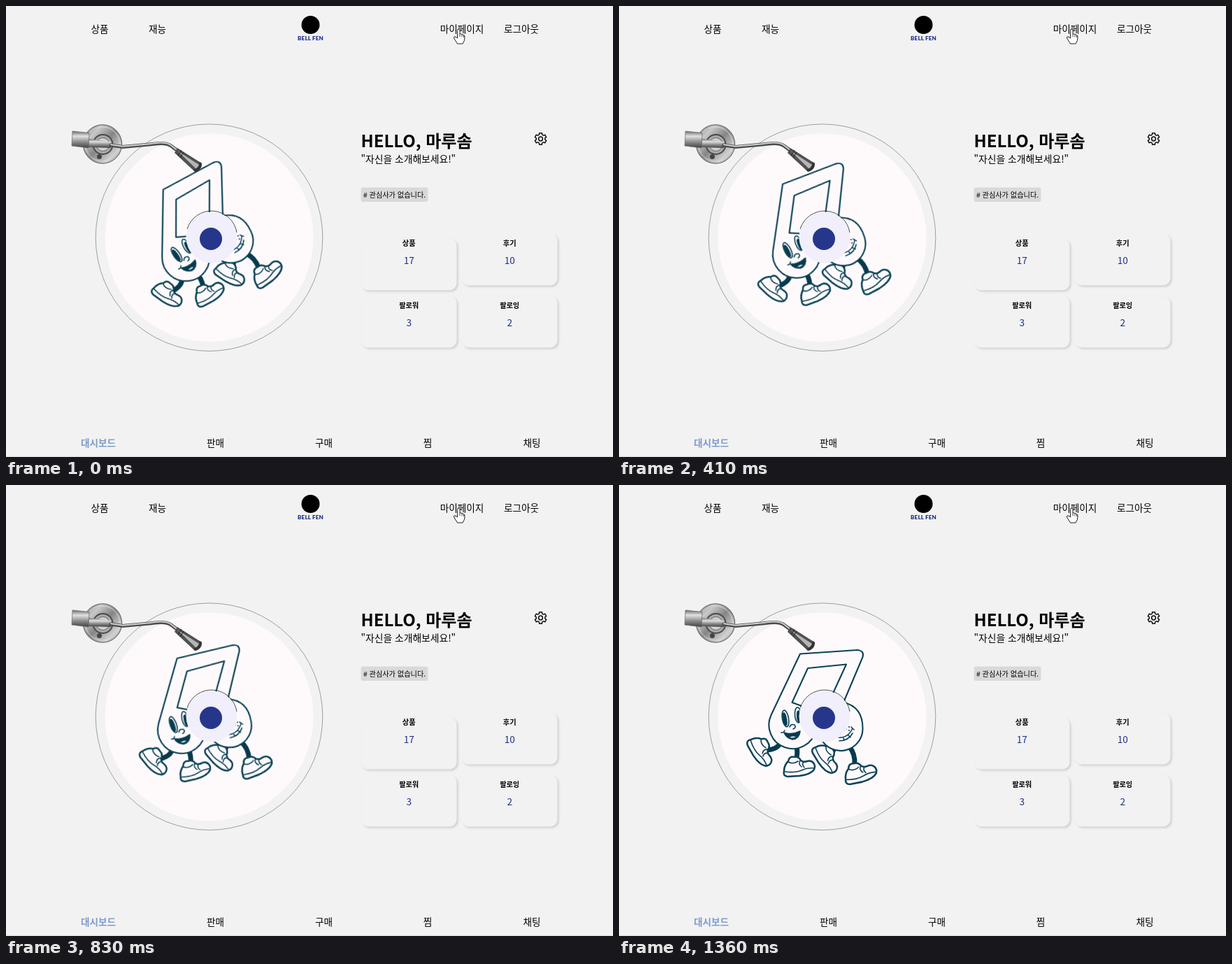
An HTML page for the animation above (1430 ms loop, 868x645 px).

```html
<!DOCTYPE html>
<html lang="ko">
<head>
<meta charset="utf-8">
<title>Dashboard</title>
<style>
  html, body { margin: 0; width: 100%; height: 100%; overflow: hidden; background: #f2f2f2; }
  svg { display: block; width: 868px; height: 645px; }
  text { font: 400 13.6px "Noto Sans CJK KR", "Noto Sans KR", "Noto Sans CJK", sans-serif; fill: #000; }
  .card { fill: #f2f2f2; filter: drop-shadow(2px 2px 1.5px #cfcfcf); }
  #walker { transform-origin: 290.5px 331px; }
  .ink { fill: #fefafc; stroke: #0c4257; stroke-width: 2.1; stroke-linejoin: round; stroke-linecap: round; }
  .fine { stroke-width: 1.6; }
  .heavy { stroke-width: 2.5; }
  .line { fill: none; }
  .leg { fill: none; stroke: #073a4c; stroke-width: 7; stroke-linecap: round; }
  .dark { fill: #073a4c; }
</style>
</head>
<body>
<svg viewBox="0 0 868 645">
  <defs>
    <linearGradient id="steel" x1="0" y1="0" x2="1" y2="1">
      <stop offset="0" stop-color="#6a6a6a"/><stop offset=".25" stop-color="#c9c9c9"/>
      <stop offset=".5" stop-color="#858585"/><stop offset=".78" stop-color="#d0d0d0"/>
      <stop offset="1" stop-color="#6e6e6e"/>
    </linearGradient>
    <linearGradient id="tube" x1="0" y1="0" x2="0" y2="1">
      <stop offset="0" stop-color="#6a6a6a"/><stop offset=".3" stop-color="#e2e2e2"/>
      <stop offset=".65" stop-color="#8a8a8a"/><stop offset="1" stop-color="#404040"/>
    </linearGradient>
    <g id="shoe" class="ink heavy">
      <path d="M-10 3Q-9-4-2-3Q5-4 8 2Q12 5 17 3C25 1 30 8 27 15Q22 22 6 24L-11 25Q-18 24-16 17Q-16 9-10 3Z"/>
      <path class="line fine" d="M-15 18Q0 20 9 16T27 13M7 2Q4 7 9 11M12 4Q9 8 13 12M-10 4Q-3 8 4 3"/>
    </g>
  </defs>

  <rect y="644" width="868" height="1" fill="#dcdcdc"/>

  <circle cx="435.5" cy="27" r="13" fill="#000"/>

  <circle cx="290.5" cy="331.2" r="162.3" fill="none" stroke="#666" stroke-width=".6"/>
  <circle cx="290.5" cy="331.2" r="149" fill="#fefafc"/>

  <g id="walker">
    <path class="leg" d="M231 368Q228 377 213 379M254 374Q256 384 253 394M308 376Q306 384 299 386M329 374Q338 384 337 400"/>
    <use href="#shoe" transform="translate(211 371) rotate(64)"/>
    <use href="#shoe" transform="translate(252 392)"/>
    <use href="#shoe" transform="translate(304 381) rotate(62)"/>
    <use href="#shoe" transform="translate(338 401) rotate(-8) scale(1.03)"/>
    <path class="ink" d="M259 241.500L341 236Q351 237 348.500 246L321 311Q348.500 317 348.500 348A31.500 31.500 0 0 1 289 363L281.500 351A34 34 0 1 1 217.500 329Z"/>
    <path class="ink" d="M270 262L325 256.500L305 300L290 320L261 316L247.500 311Z"/>
    <g class="ink fine">
      <ellipse cx="238" cy="334" rx="4.500" ry="12" transform="rotate(-10 238 334)"/>
      <ellipse cx="256" cy="329" rx="4.500" ry="11" transform="rotate(-4 256 329)"/>
      <ellipse class="dark" cx="237" cy="335" rx="2.500" ry="9" transform="rotate(-10 237 335)"/>
      <ellipse class="dark" cx="257" cy="331" rx="2.300" ry="8" transform="rotate(-4 257 331)"/>
      <path class="line" d="M244 346Q246 341 251 343Q254 347 249 349"/>
      <path class="dark" d="M236 354Q247 358 259 352Q258 363 248 364Q239 362 236 354Z"/>
      <path d="M243 361Q248 357 254 360Q249 364 243 361Z"/>
      <path class="line" d="M232 354Q235 355 237 351M312 361Q327 363 334 348M315 366Q328 366 334 355M321 362L322 365M328 358L331 361M332 346L336 350"/>
    </g>
    <g class="dark">
      <circle cx="325" cy="349" r="1"/><circle cx="329" cy="346" r="1"/><circle cx="329" cy="351" r="1"/>
    </g>
  </g>

  <circle cx="294" cy="331" r="36.500" fill="#f0effb"/>
  <path d="M259 319A36.500 36.500 0 0 1 330 324" fill="none" stroke="#222" stroke-width=".8"/>
  <circle cx="293" cy="333" r="16" fill="#26368b"/>

  <g id="arm">
    <circle cx="138" cy="197.500" r="27.700" fill="url(#steel)" stroke="#555"/>
    <circle cx="138" cy="197.500" r="24.500" fill="none" stroke="#e0e0e0" stroke-width=".8"/>
    <circle cx="138.500" cy="198" r="14" fill="#aaa" stroke="#4a4a4a" stroke-width="2"/>
    <circle cx="138.500" cy="198" r="9.500" fill="#d0d0d0" stroke="#666"/>
    <circle cx="133.500" cy="215.500" r="3.500" fill="#444"/>
    <path d="M118 190L150 194V203L118 202Z" fill="url(#tube)"/>
    <path d="M95 179L119 181.500L118 203L94 200Z" fill="url(#tube)" stroke="#666" stroke-width=".7"/>
    <g fill="none" stroke-linecap="round">
      <path d="M150 199L167 201.500L205 198Q228 194 236 200L248 209" stroke="#4b4b4b" stroke-width="5"/>
      <path d="M150 198.200L167 200.700L205 197.200Q228 193.200 236 199.200L247 208" stroke="#cfcfcf" stroke-width="2"/>
    </g>
    <path d="M245 203L280 225Q280 235 270 237L241 210Z" fill="#505050"/>
    <path d="M245 207L276 227Q276 232 272 233Z" fill="#b5b5b5"/>
    <path d="M251 206L246 214M254 209L249 217" stroke="#222"/>
    <path d="M280 225Q280 235 270 237L268 234Q276 232 277 223Z" fill="#333"/>
  </g>

  <path id="gear" fill="none" stroke="#111" stroke-width="1.500" stroke-linejoin="round"/>
  <circle cx="764.500" cy="190" r="2.900" fill="none" stroke="#111" stroke-width="1.500"/>

  <rect x="507.500" y="259.500" width="96" height="20.500" rx="3" fill="#d9d9d9"/>
  <g id="cards"></g>
  <g id="labels"></g>

  <path d="M645.500 35.500Q645 33 647 33Q649 33 649 35.500V40Q651 39 652 41Q654 40 654.500 42Q656.500 42 656 45Q656 50 653 54H645.500Q643 50 640.500 46Q640 43 643 44L645.500 46Z"
        fill="#fff" stroke="#222" stroke-linejoin="round"/>
  <path d="M649 40V44M652 41V44.500M654.500 42V45" stroke="#222" stroke-width=".8"/>
</svg>
<script>
const NS = "http://www.w3.org/2000/svg";
const $ = id => document.getElementById(id);

function add(parent, tag, attrs, content = "") {
  const el = document.createElementNS(NS, tag);
  for (const [k, v] of Object.entries(attrs)) el.setAttribute(k, v);
  el.textContent = content;
  parent.append(el);
}

function label(str, x, y, style = "", anchor = "middle") {
  add($("labels"), "text", { x, y, style, "text-anchor": anchor }, str);
}

const navy = "fill:#1f2f87;";
const bold = "font-weight:700;";

[["상품", 134], ["재능", 216.5], ["마이페이지", 652], ["로그아웃", 737]]
  .forEach(([s, x]) => label(s, x, 38));
[["판매", 299.5], ["구매", 454.5], ["찜", 603], ["채팅", 752]]
  .forEach(([s, x]) => label(s, x, 629.5));
label("대시보드", 132, 629.5, bold + "fill:#7d9bcd");
label("BELL FEN", 435.5, 49, navy + "font:900 8px Lato,sans-serif;letter-spacing:.2px");
label("HELLO, 마루솜", 507.5, 201.5, bold + "font-size:24px", "start");
label('"자신을 소개해보세요!"', 507.5, 224, "font-size:13.8px", "start");
label("# 관심사가 없습니다.", 511, 274, "font-size:10.2px", "start");

[["상품", 17, 508, 333, 339], ["후기", 10, 652, 326, 339],
 ["팔로워", 3, 508, 415, 428], ["팔로잉", 2, 652, 415, 428]]
  .forEach(([name, count, x, y, mid]) => {
    add($("cards"), "rect", { class: "card", x, y, width: 136.5, height: 73.5, rx: 10 });
    label(name, x + 68.2, mid + 4.3, bold + "font-size:10.2px");
    label(count, x + 68.2, mid + 30, navy);
  });

// Six-toothed settings cog
const rim = [[-30, 6.2], [-19, 6.4], [-13, 8.5], [13, 8.5], [19, 6.4]];
const cog = [];
for (let tooth = 0; tooth < 6; tooth++) {
  for (const [deg, r] of rim) {
    const a = (tooth * 60 + deg - 90) * Math.PI / 180;
    cog.push(`${764.5 + r * Math.cos(a)} ${190 + r * Math.sin(a)}`);
  }
}
$("gear").setAttribute("d", `M${cog.join("L")}Z`);

// The record turns once in 20 s, shown in held poses
const loop = 1430;
const degPerMs = 360 / 20000;
const restAngle = -1360 * degPerMs;
const times = [0, 60, 130, 200, 270, 340, 410, 480, 550, 620, 680,
  760, 830, 900, 970, 1030, 1090, 1160, 1230, 1290, 1360];
const pose = t => ({
  offset: t / loop,
  transform: `rotate(${restAngle + t * degPerMs}deg)`,
  easing: "step-end"
});
const poses = times.map(pose);
poses.push({ ...poses[poses.length - 1], offset: 1 });
$("walker").animate(poses, { duration: loop, iterations: Infinity });
</script>
</body>
</html>
```
